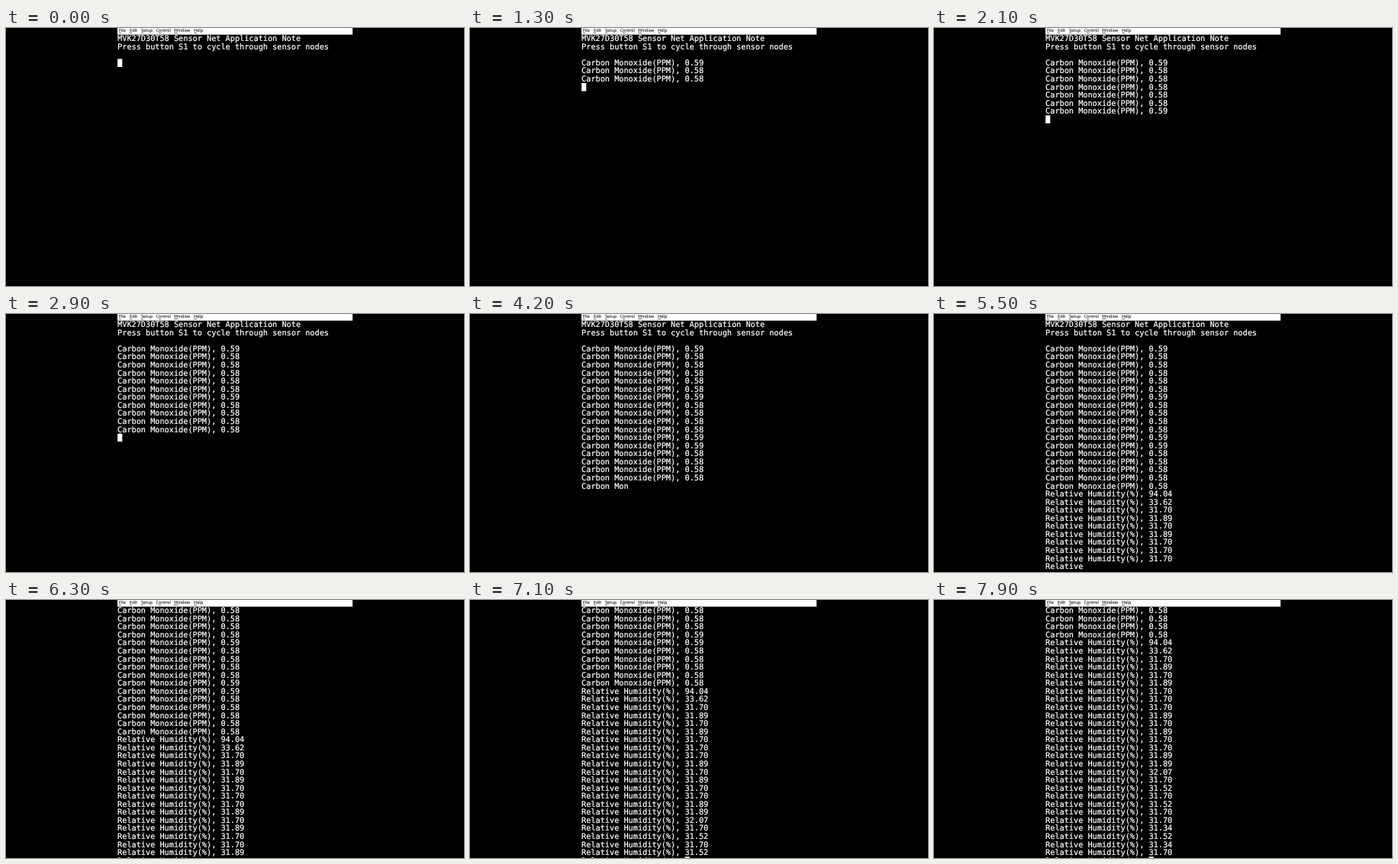
An HTML page that plays this animation: 600x338 px, repeating every 8000 ms.

```html
<!DOCTYPE html>
<html lang="en">
<head>
<meta charset="utf-8">
<title>Sensor terminal</title>
<style>
  html, body { margin: 0; width: 100%; height: 100%; overflow: hidden; background: #000; }
  svg { display: block; width: 100%; height: 100%; }
  text { text-rendering: geometricPrecision; white-space: pre; }
  #screen { font: 10.22px "DejaVu Sans Mono", monospace; fill: #fff; stroke: #fff; stroke-width: .22; }
  #menu { font: 5.6px "Open Sans", sans-serif; fill: #111; stroke: #111; stroke-width: .08; }
  .key { text-decoration: underline; }
</style>
</head>
<body>
<svg viewBox="0 0 600 338">
  <rect width="600" height="338"/>
  <g id="screen"></g>
  <rect id="cursor" width="6.2" height="10.5" fill="#fff"/>
  <rect x="146" width="308" height="8.7" fill="#fff"/>
  <g id="menu">
    <text x="148" y="5.2"><tspan class="key">F</tspan>ile</text>
    <text x="162" y="5.2"><tspan class="key">E</tspan>dit</text>
    <text x="177" y="5.2"><tspan class="key">S</tspan>etup</text>
    <text x="196.5" y="5.2">C<tspan class="key">o</tspan>ntrol</text>
    <text x="220" y="5.2"><tspan class="key">W</tspan>indow</text>
    <text x="246" y="5.2"><tspan class="key">H</tspan>elp</text>
  </g>
</svg>
<script>
const LOOP = 8000, STEP = 100, ROWS = 32;
const LEFT = 146.1, TOP = 8.8, ROW = 10.565, CHAR = 6.153;
const LINE_TIME = 28;  // characters' worth of time per line
const VALUE_COL = 22;  // column where a humidity value starts

const header = [
  'MVK27D30T58 Sensor Net Application Note',
  'Press button S1 to cycle through sensor nodes',
  ''
];
const gas = Array.from({ length: 18 }, (_, i) =>
  'Carbon Monoxide(PPM), 0.5' + ([0, 6, 11, 12].includes(i) ? 9 : 8));
const humidity = ('94.04 33.62 31.70 31.89 31.70 31.89 31.70 31.70 31.70 31.89 ' +
  '31.70 31.89 31.70 31.70 31.89 31.89 32.07 31.70 31.52 31.70 ' +
  '31.52 31.70 31.70 31.34 31.52 31.34 31.70 31.70')
  .split(' ').map(v => 'Relative Humidity(%), ' + v);
const lines = [...header, ...gas, ...humidity];

// [time, readings printed so far]
const pace = [[0, 0], [700, 0], [1300, 3], [2900, 11], [4200, 17.36],
  [4300, 18.1], [5500, 27.3], [7100, 39.8], [7900, 45.8]];

function printed(t) {
  const i = pace.findIndex(p => p[0] >= t);
  if (i <= 0) return 0;
  const [t0, a] = pace[i - 1], [t1, b] = pace[i];
  return a + (b - a) * (t - t0) / (t1 - t0);
}

const screen = document.getElementById('screen');
const cursor = document.getElementById('cursor');
const rows = Array.from({ length: ROWS }, (_, i) => {
  const row = document.createElementNS('http://www.w3.org/2000/svg', 'text');
  row.setAttribute('x', LEFT);
  row.setAttribute('y', TOP + i * ROW + 8.4);
  return screen.appendChild(row);
});

function draw(t) {
  const done = printed(Math.floor(t / STEP) * STEP);
  const current = header.length + Math.floor(done);
  const col = Math.min(Math.floor(done % 1 * LINE_TIME), lines[current].length);
  const first = Math.max(0, current - ROWS + 1);

  rows.forEach((row, i) => {
    const n = first + i;
    const text = n < current ? lines[n] : n === current ? lines[n].slice(0, col) : '';
    if (row.textContent !== text) row.textContent = text;
  });
  cursor.setAttribute('x', LEFT + col * CHAR);
  cursor.setAttribute('y', TOP + (current - first) * ROW);
  // the cursor shows only while output pauses
  cursor.setAttribute('visibility', col % VALUE_COL ? 'hidden' : 'visible');
}

const start = performance.now();
function tick() {
  draw((performance.now() - start) % LOOP);
  requestAnimationFrame(tick);
}
tick();
</script>
</body>
</html>
```
